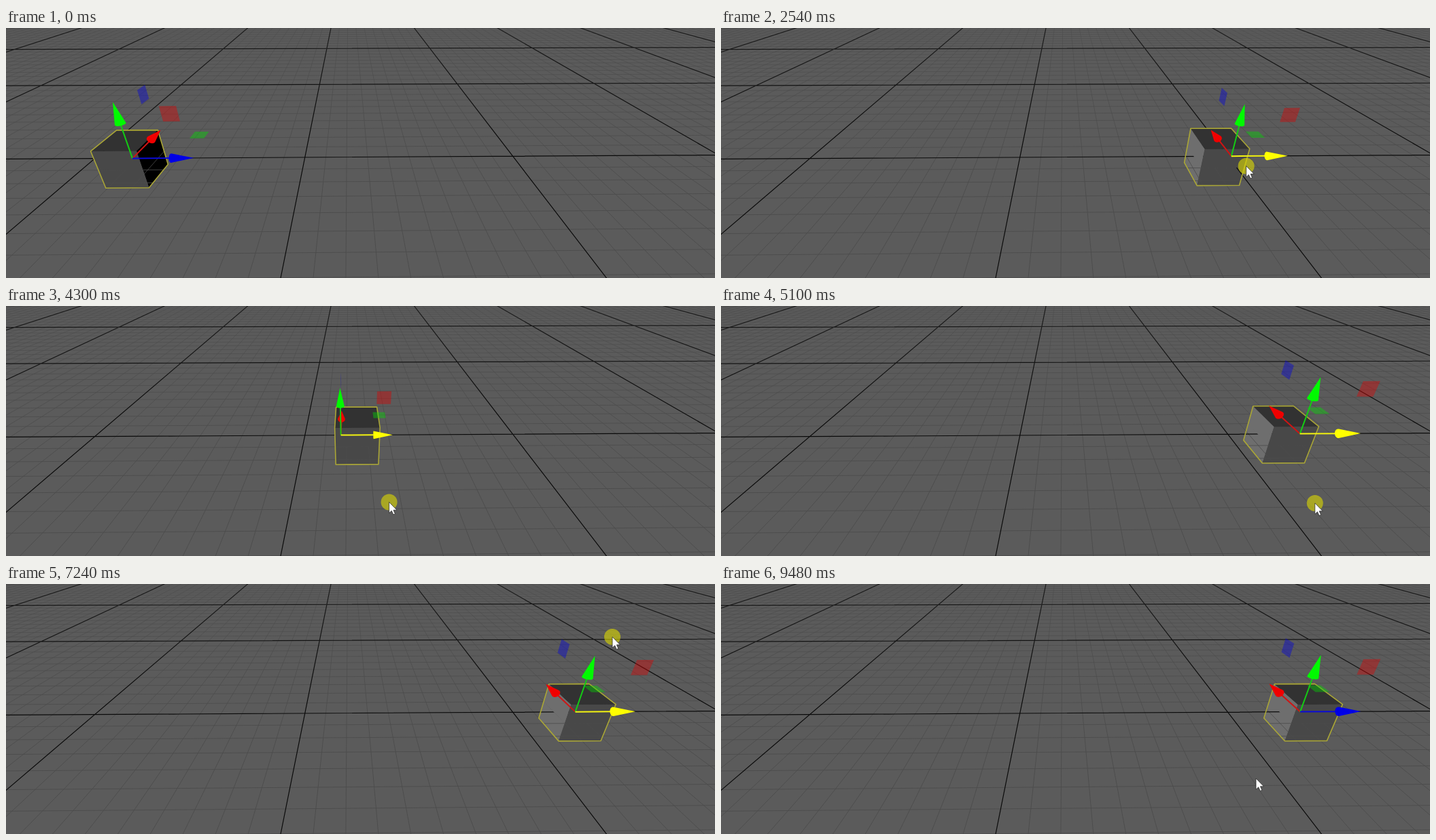
An HTML page for the animation above (9.51 s loop, 1043 by 369 pixels).

```html
<!DOCTYPE html>
<html lang="en">
<head>
<meta charset="utf-8">
<title>Dragging a cube along an axis</title>
<style>
html, body { margin: 0; width: 100%; height: 100%; overflow: hidden; background: #5b5b5b; }
svg { display: block; width: 1043px; height: 369px; }
</style>
</head>
<body>
<svg id="stage" viewBox="0 0 1043 369" xmlns="http://www.w3.org/2000/svg">
  <defs>
    <linearGradient id="fade" gradientUnits="userSpaceOnUse" x1="0" y1="0" x2="0" y2="260">
      <stop offset="0" stop-color="#4b4b4b" stop-opacity=".6"/>
      <stop offset="1" stop-color="#4b4b4b"/>
    </linearGradient>
    <linearGradient id="dark" gradientUnits="userSpaceOnUse" x1="0" y1="0" x2="0" y2="160">
      <stop offset="0" stop-color="#1c1c1c"/>
      <stop offset="1" stop-color="#0a0a0a"/>
    </linearGradient>
  </defs>
  <rect width="1043" height="369" fill="#5b5b5b"/>
</svg>
<script>
const LOOP = 9510, LAG = 25;
const HALF = 0.1;                       // half the cube's side, in large grid cells
const PRESS = 960, RELEASE = 8500;
const VX = 503.4, VY = -126.7;          // vanishing point of the depth axis
const UX = 510.6, UY = 1122;            // vanishing point of the vertical axis
const CY = 161, FOCAL = 526;
const A = 0.003152, B = 0.001613, E = 0.0000181, K = 0.000883, CELL = 0.967;

const stage = document.getElementById('stage');

function add(tag, attrs, parent = stage) {
  const el = document.createElementNS('http://www.w3.org/2000/svg', tag);
  for (const k in attrs) el.setAttribute(k, attrs[k]);
  return parent.appendChild(el);
}
const poly = (fill, extra) => add('polygon', { fill, ...extra });
const put = (el, pts) => el.setAttribute('points', pts.map(p => p[0].toFixed(2) + ',' + p[1].toFixed(2)).join(' '));

// u: right, w: away, h: up, measured from the slope s0 on the ground axis
function project(s0, u, w, h) {
  const s = s0 + CELL * u, g = A + B * w + E * s, z = K * h, q = g - z;
  return [(VX * g + s - UX * z) / q, (1 + VY * g - UY * z) / q];
}
const slopeAt = x => (x - VX) * A / (1 - E * (x - VX));

// smooth curve through keys without overshoot
function curve(keys) {
  const n = keys.length;
  const d = keys.slice(1).map((k, i) => (k[1] - keys[i][1]) / (k[0] - keys[i][0]));
  const m = keys.map((_, i) => {
    if (i === 0 || i === n - 1 || d[i - 1] * d[i] <= 0) return 0;
    return 2 * d[i - 1] * d[i] / (d[i - 1] + d[i]);
  });
  return t => {
    if (t <= keys[0][0]) return keys[0][1];
    if (t >= keys[n - 1][0]) return keys[n - 1][1];
    let i = 0;
    while (t > keys[i + 1][0]) i++;
    const len = keys[i + 1][0] - keys[i][0], p = (t - keys[i][0]) / len, r = 1 - p;
    return keys[i][1] * r * r * (1 + 2 * p) + keys[i + 1][1] * p * p * (3 - 2 * p)
      + len * p * r * (m[i] * r - m[i + 1] * p);
  };
}

const cubeX = curve([[1000, 186], [1250, 330], [1500, 530], [1700, 642], [1870, 671], [1940, 726],
  [2180, 878], [2330, 870], [2650, 620], [2920, 357], [3070, 308], [3270, 293], [3820, 266],
  [3930, 268], [4200, 430], [4550, 740], [4800, 862], [4940, 874], [5075, 852], [5100, 821],
  [5125, 790], [5400, 490], [5820, 319], [6200, 303], [6440, 299], [6530, 294], [6810, 520],
  [7060, 862], [7240, 836], [7500, 834], [7780, 840], [8020, 860], [8300, 852]]);
const mouseGap = curve([[500, 138], [750, 66], [900, 62], [1870, 57], [3270, 38], [5100, 54],
  [6440, 29], [7240, 56], [8740, 54], [9150, -65]]);
const mouseY = curve([[0, 410], [500, 386], [750, 255], [900, 195], [1870, 201], [3270, 208],
  [3890, 281], [4500, 292], [4880, 296], [5100, 291], [5400, 262], [5840, 175], [6250, 75],
  [6440, 72], [6820, 77], [7240, 78], [7600, 95], [8300, 283], [8600, 287]]);

function hull(pts) {
  const sorted = [...pts].sort((a, b) => a[0] - b[0] || a[1] - b[1]);
  const half = list => {
    const out = [];
    for (const p of list) {
      while (out.length > 1) {
        const a = out[out.length - 2], b = out[out.length - 1];
        if ((b[0] - a[0]) * (p[1] - a[1]) - (b[1] - a[1]) * (p[0] - a[0]) > 0) break;
        out.pop();
      }
      out.push(p);
    }
    return out.slice(0, -1);
  };
  return [...half(sorted), ...half(sorted.reverse())];
}

// cube faces, seen clockwise on screen
const D = HALF;
const FACES = [
  ['#6e6e6e', lo => [[-D, D, D], [-D, -D, D], [-D, -D, lo], [-D, D, lo]]],
  ['#000', lo => [[D, -D, D], [D, D, D], [D, D, lo], [D, -D, lo]]],
  ['#484848', lo => [[-D, -D, D], [D, -D, D], [D, -D, lo], [-D, -D, lo]]],
  ['#323232', () => [[-D, D, D], [D, D, D], [D, -D, D], [-D, -D, D]]]
];
const CORNERS = [-D, D].flatMap(u => [-D, D].flatMap(w => [-D, D].map(h => [u, w, h])));

function makeSolid(low) {
  const parts = FACES.map(([fill, at]) => [poly(fill), at(low)]);
  return s => parts.forEach(([el, pts]) => {
    const p = pts.map(c => project(s, ...c));
    const area = p.reduce((sum, a, i) => {
      const b = p[(i + 1) % 4];
      return sum + a[0] * b[1] - a[1] * b[0];
    }, 0);
    put(el, area > 0 ? p : []);
  });
}

function gridPath(major) {
  const home = -0.2005;
  let d = '';
  const seg = (a, b) => {
    d += 'M' + a.map(v => v.toFixed(1)) + 'L' + b.map(v => v.toFixed(1));
  };
  for (let i = -70; i <= 70; i++) {
    if ((i % 10 === 0) !== major) continue;
    seg(project(home, i / 10, -0.8, 0), project(home, i / 10, 3.4, 0));
    if (i >= -8 && i <= 33) seg(project(home, -7, i / 10, 0), project(home, 7, i / 10, 0));
  }
  return d;
}

// the ground hides nothing but its lines cross the sunken half of the cube
const drawWhole = makeSolid(-D);
add('path', { d: gridPath(false), stroke: 'url(#fade)', 'stroke-width': 0.9, fill: 'none' });
add('path', { d: gridPath(true), stroke: 'url(#dark)', 'stroke-width': 1.2, fill: 'none' });
const drawUpper = makeSolid(0);
const outline = poly('none', { stroke: '#aaa636', 'stroke-width': 1.6, 'stroke-linejoin': 'round' });

const N = 0.67, F = 0.93;
const SQUARE = [[N, N], [F, N], [F, F], [N, F]];
const panes = [
  ['rgba(0,0,222,.4)', (a, b) => [0, a, b]],
  ['rgba(222,0,0,.4)', (a, b) => [a, 0, b]],
  ['rgba(0,222,0,.4)', (a, b) => [a, b, 0]]
].map(([fill, at]) => [poly(fill), SQUARE.map(c => at(...c))]);

const spot = add('circle', { r: 12, fill: '#dddb00', 'fill-opacity': 0.6 });

const axes = [
  ['#d01414', '#f00000', (a, b, c) => [b, a, c]],
  ['#14cc14', '#00fa00', (a, b, c) => [b, c, a]],
  ['#0a0ad8', '#0000e6', (a, b, c) => [a, b, c]]
].map(([line, head, at]) => ({
  line, head, at,
  rod: add('line', { 'stroke-width': 2 }),
  cone: poly(head)
}));

const pointer = add('path', {
  d: 'M0 0V16.2L3.7 12.8L6.2 18.4L8.8 17.3L6.4 11.8H11.4Z',
  fill: '#fff', stroke: '#222', 'stroke-width': 0.7
});

const BASE = 0.63, RADIUS = 0.076;

function drawGizmo(x, held) {
  const s = slopeAt(x), mid = project(s, 0, 0, 0);
  const size = 0.000471 * Math.hypot(mid[0] - UX, mid[1] - CY, FOCAL);
  const at = p => project(s, ...p.map(v => v * size));
  panes.forEach(([el, pts]) => put(el, pts.map(at)));
  axes.forEach((axis, i) => {
    const hot = held && i === 2, end = at(axis.at(BASE, 0, 0));
    const pts = [at(axis.at(1, 0, 0))];
    for (let k = 0; k < 20; k++) {
      const r = k * Math.PI / 10;
      pts.push(at(axis.at(BASE, RADIUS * Math.cos(r), RADIUS * Math.sin(r))));
    }
    put(axis.cone, hull(pts));
    axis.cone.setAttribute('fill', hot ? '#ffff00' : axis.head);
    axis.rod.setAttribute('stroke', hot ? '#f4f410' : axis.line);
    ['x1', 'y1', 'x2', 'y2'].forEach((k, j) => axis.rod.setAttribute(k, [...mid, ...end][j]));
  });
}

function draw(t) {
  const x = cubeX(t), s = slopeAt(x);
  drawWhole(s);
  drawUpper(s);
  put(outline, hull(CORNERS.map(c => project(s, ...c))));
  drawGizmo(cubeX(t - LAG), t > PRESS && t < RELEASE);

  const mx = x + mouseGap(t), my = mouseY(t);
  spot.setAttribute('cx', mx);
  spot.setAttribute('cy', my);
  spot.setAttribute('visibility', t < RELEASE ? 'visible' : 'hidden');
  pointer.setAttribute('transform', `translate(${mx} ${my})`);
}

const start = performance.now();
function tick(now) {
  draw(Math.max(0, now - start) % LOOP);
  requestAnimationFrame(tick);
}
draw(0);
requestAnimationFrame(tick);
</script>
</body>
</html>
```
